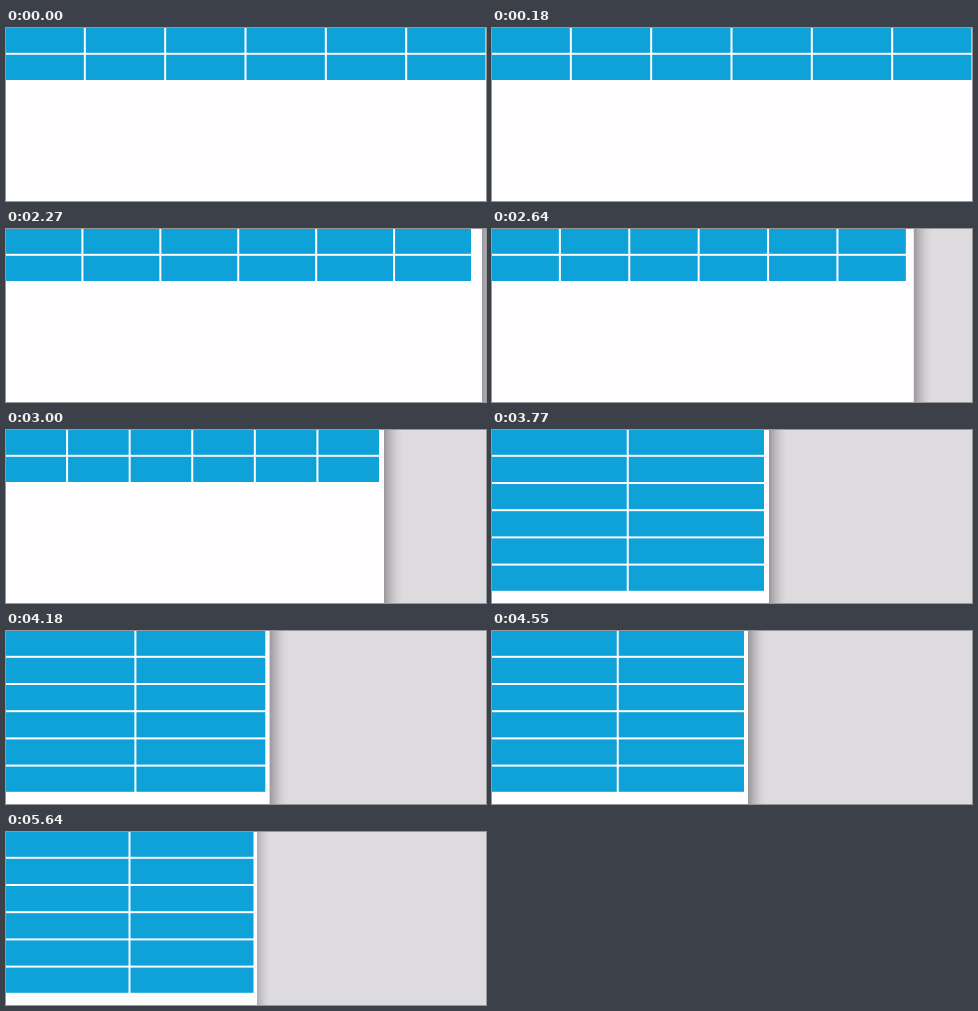
An HTML page with a canvas that plays this animation: 480 px wide and 173 px high, repeating every 6.4 s.

```html
<!DOCTYPE html>
<html lang="en">
<head>
<meta charset="utf-8">
<style>
  html, body { margin: 0; width: 100%; height: 100%; overflow: hidden; background: #fefdff; }
  canvas { display: block; }
</style>
</head>
<body>
<canvas id="stage" width="480" height="173"></canvas>
<script>
const ctx = document.getElementById('stage').getContext('2d');
const LOOP = 6400, FPS = 22, CELLS = 12, ROW = 27.2;

// [ms, right side of the cells, right side of the window]
const drag = [
  [2270, 465, 476], [2910, 376.5, 382], [3000, 373, 378], [3450, 314, 320.5],
  [3590, 290, 295.5], [3770, 272, 277], [4270, 256.5, 260.5], [4550, 252, 256],
  [4680, 248.5, 252], [5000, 247.5, 251]
];

function sizeAt(ms) {
  if (ms < drag[0][0]) return [479.5, 500];
  const next = drag.findIndex(key => key[0] > ms);
  if (next < 0) return drag[drag.length - 1].slice(1);
  const a = drag[next - 1], b = drag[next];
  const p = (ms - a[0]) / (b[0] - a[0]);
  return [1, 2].map(i => a[i] + (b[i] - a[i]) * p);
}

function fill(color, x, y, w, h) {
  ctx.fillStyle = color;
  ctx.fillRect(x, y, w, h);
}

function drawShadow(edge, strength, reach) {
  const shade = ctx.createLinearGradient(edge, 0, edge + reach, 0);
  for (let i = 0; i <= 5; i++) {
    shade.addColorStop(i / 5, `rgba(40,38,42,${strength * (1 - i / 5) ** 1.7})`);
  }
  fill(shade, edge, 0, reach, 173);
}

function draw(ms) {
  const [right, edge] = sizeAt(ms);
  const columns = ms >= 3540 ? 2 : 6;
  const pitch = (right + 2.5) / columns;
  const released = ms >= 5630;

  fill('#dddbde', 0, 0, 480, 173);
  drawShadow(edge, released ? 0.25 : 0.38, released ? 14 : 19);
  fill('#fefdff', 0, 0, edge, 173);
  for (let i = 0; i < CELLS; i++) {
    const x = (i % columns) * pitch - 0.5;
    const y = Math.floor(i / columns) * ROW - 0.4;
    fill('#0fa2d9', x, y, pitch - 2, ROW - 2);
  }
}

function tick() {
  const ms = performance.now() % LOOP;
  draw(Math.round(Math.floor(ms * FPS / 1000 + 0.12) * 100 / FPS) * 10);
  requestAnimationFrame(tick);
}
tick();
</script>
</body>
</html>
```
